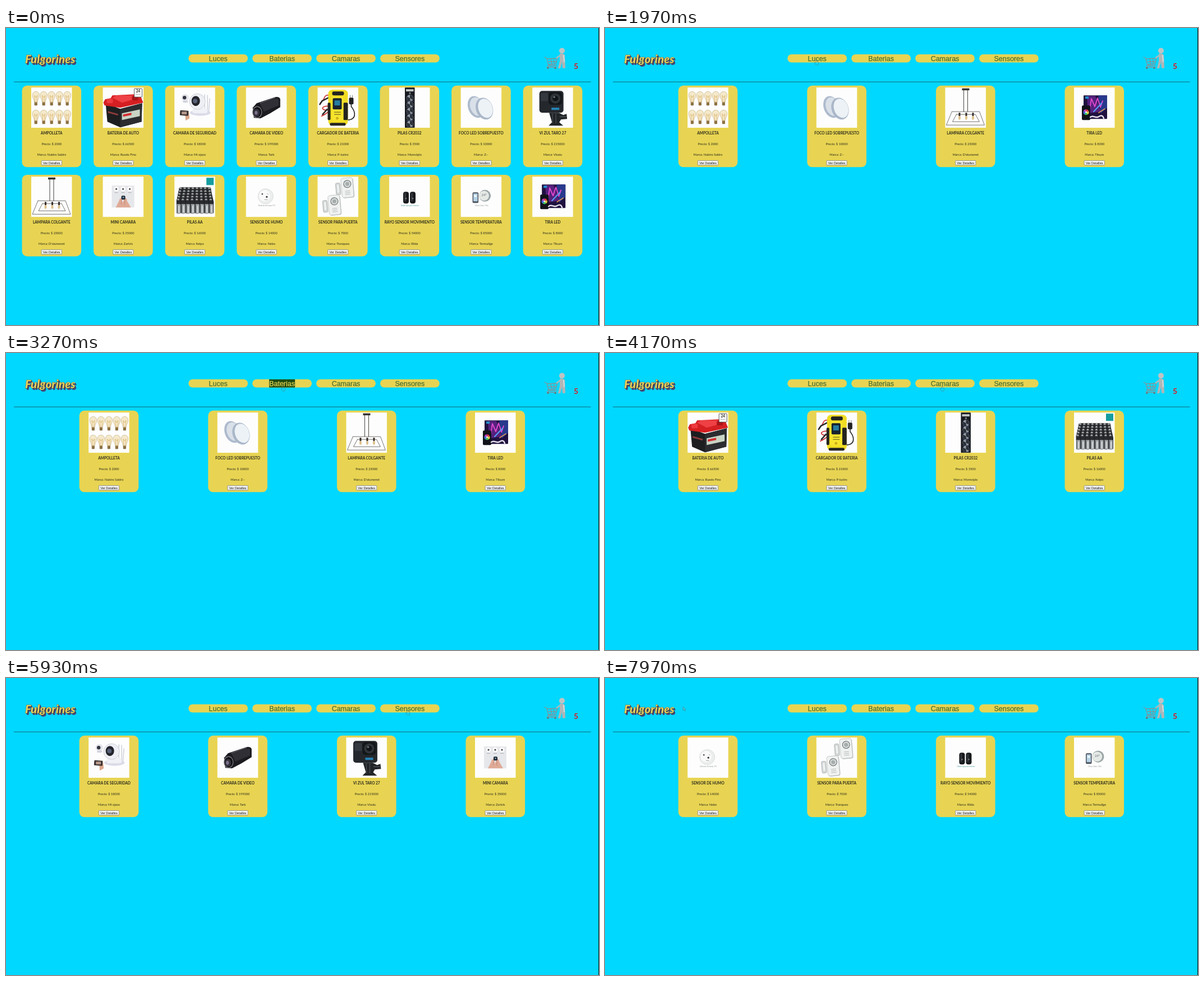
An HTML page that plays this animation: 1057x530 px, repeating every 8000 ms.

```html
<!DOCTYPE html>
<html lang="es">
<head>
<meta charset="utf-8">
<style>
  html, body { margin: 0; width: 100%; height: 100%; overflow: hidden; background: #00d8ff; }
  svg { display: block; }
  text { text-anchor: middle; fill: #2b2a1c; font-family: Lato, sans-serif; }
  .title { font-size: 6.5px; font-weight: 700; }
  .line { font-size: 5.6px; }
  .button { font: 5.7px "Liberation Sans", sans-serif; fill: #111; }
  .nav { font: 12.5px "Liberation Sans", sans-serif; fill: #487032; stroke: #487032; stroke-width: .25px; }
  .tiny { font-size: 3px; fill: #8a8f94; }
  .logo { font-size: 20.3px; font-weight: 900; font-style: italic; text-anchor: start; }
</style>
</head>
<body>
<svg id="stage" width="1057" height="530" viewBox="0 0 1057 530"></svg>
<script>
const rect = (x, y, w, h, fill, r = 0, more = '') =>
  `<rect x="${x}" y="${y}" width="${w}" height="${h}" rx="${r}" fill="${fill}" ${more}/>`;
const disc = (x, y, r, fill, more = '') => `<circle cx="${x}" cy="${y}" r="${r}" fill="${fill}" ${more}/>`;
const oval = (x, y, rx, ry, fill, more = '') =>
  `<ellipse cx="${x}" cy="${y}" rx="${rx}" ry="${ry}" fill="${fill}" ${more}/>`;
const shape = (d, fill, more = '') => `<path d="${d}" fill="${fill}" ${more}/>`;
const stroke = (d, color, width = 1) =>
  shape(d, 'none', `stroke="${color}" stroke-width="${width}" stroke-linecap="round" stroke-linejoin="round"`);
const text = (x, y, cls, str, more = '') => `<text x="${x}" y="${y}" class="${cls}" ${more}>${str}</text>`;
const group = (x, y, body, more = '') => `<g transform="translate(${x} ${y}) ${more}">${body}</g>`;
const repeat = (n, fn) => Array.from({ length: n }, (_, i) => fn(i)).join('');

// Product pictures, each on a 72 x 72 square
const bulb = () => rect(-2.6, 8, 5.2, 7, '#80663b', 1) + stroke('M-2 10.5H2M-2 13H2', '#b79a62', .6) +
  shape('M-2.8 9C-3 4-6.2 2-6.2-3.6A6.2 6.2 0 0 1 6.2-3.6C6.2 2 3 4 2.8 9Z', '#f4e9cb', 'stroke="#c6ae7c" stroke-width=".7"') +
  stroke('M-1.5 8L-2.5-3L0 1L2.5-3L1.5 8', '#d8ab5c', .7);

const bulbs = () => repeat(10, i => group(8.2 + i % 5 * 14, i < 5 ? 17 : 50, bulb()));

const carBattery = () =>
  shape('M5 28L8 61L31 71L69 61L70 28L31 38Z', '#1d1e20') + shape('M31 38L70 28L69 61L31 71Z', '#2b2d30') +
  shape('M1 27L4 21L14 19L17 14L58 12L68 17L72 27L31 36L3 32Z', '#d51f22') +
  shape('M17 18L24 14H56L63 19L34 27Z', '#ee4045') + rect(7, 20, 11, 8, '#ee3a3d', 2) + rect(52, 15, 11, 8, '#a81418', 2) +
  shape('M34 46L66 39V51L34 58Z', '#c9d4c5') + shape('M36 48L51 45V49L36 52Z', '#d22c30') +
  shape('M9 42L27 47V50L9 45Z', '#8d3b3c') +
  rect(56, 2, 14, 15, '#fff', 1, 'stroke="#333" stroke-width=".8"') +
  text(63, 9, 'title', '24') + text(63, 14, 'tiny', 'MESES');

const securityCamera = () =>
  stroke('M54 13V43M59 14V42M63 20L61 45', '#d4d5de', 1.7) +
  oval(46, 45, 18, 5.5, '#dadbe7') + rect(32, 37, 27, 9, '#f0f0f7', 4) +
  disc(41, 25, 14, '#eeeef5', 'stroke="#cdced9"') + oval(38, 24, 7.5, 9, '#23242b') + disc(37, 24, 4, '#586078') +
  disc(19, 18, 6.5, '#e6e6ec') + rect(15, 23, 9, 4, '#d3d3df', 2) + disc(18, 18, 3.2, '#333640') +
  shape('M19 48L26 45L27 55L20 59Z', '#dca78d') +
  rect(10, 41, 15, 9, '#3a302f', 1, 'transform="rotate(5 17 45)"') + rect(13, 43, 9, 5, '#b6988a');

const camcorder = () =>
  shape('M12 36L19 28L52 17Q60 16 61 21V35L43 46L26 55L14 54Z', '#1b1a1f') +
  shape('M25 29L51 20Q58 18 58 23V32L32 43Z', '#302f36') + stroke('M25 28L52 18', '#777680', 1) +
  oval(20, 44, 8, 10, '#111114', 'stroke="#77757c" stroke-width="1.4"') +
  oval(19, 45, 5.5, 7, '#35323c') + oval(18, 45, 2.6, 3.5, '#7c718c');

const charger = () =>
  stroke('M21 14C10 11 14 23 5 27M20 33C3 33 8 42 18 40S14 48 7 51', '#c91b1e', 1.5) +
  stroke('M20 18L8 24L4 30M17 39L9 48', '#292929', 2.5) +
  stroke('M53 58C72 57 66 41 60 34V24', '#222', 1.6) + rect(56, 18, 8, 12, '#222', 2) + stroke('M58 18V14M62 18V14', '#777', 1) +
  rect(19, 4, 35, 63, '#f0dc22', 7) + rect(26, 7, 21, 7, '#242420', 3) +
  rect(18, 27, 5, 31, '#242420', 2) + rect(46, 27, 8, 31, '#242420', 2) +
  rect(25, 16, 21, 43, '#f7e42d', 4) + rect(27, 19, 16, 20, '#18232e', 2) + rect(30, 23, 10, 9, '#267da2') +
  stroke('M30 44H41M30 48H41', '#56511c', 1) + disc(35, 55, 2.4, '#c9ac18') + rect(22, 63, 28, 5, '#242420', 2);

const coinCells = () => rect(28, 0, 17.5, 71.7, '#181a20', 1) + rect(30, 3, 13.5, 4, '#c4c6c8') +
  disc(37, 10, 1.5, '#8b8e96') + repeat(5, i => group(37, 19 + i * 11.6,
    disc(0, 0, 6, '#2c3139', 'stroke="#636a73" stroke-width=".7"') +
    shape('M0 0L-5-3A6 6 0 0 1 0-6ZM0 0L5 3A6 6 0 0 1 1 6Z', '#929ba5') + rect(-7, 4.7, 14, 1.5, '#30374d')));

const ledSpot = () => group(29, 34, oval(-2, 0, 14, 20, '#aebacd') + oval(0, 0, 12, 17, '#d9e0e8'), 'rotate(-20)') +
  group(44, 37, oval(-2, 0, 15, 20, '#aab7ca') + oval(0, 0, 12.5, 17.5, '#edf2f6'), 'rotate(-20)');

const actionCamera = () =>
  shape('M30 45H47L55 49L61 47L62 56L51 57L48 62L55 68H29L35 62Z', '#222528') +
  stroke('M36 47V63M42 47V63M49 52H60', '#484c52', 1.4) +
  rect(12.5, 6, 43, 39, '#24282d', 5) + rect(15, 10, 13, 14, '#343940', 2) +
  rect(29, 8, 24, 23, '#14171a', 5) + disc(41, 19.5, 9, '#30353a') + disc(41, 19.5, 5, '#101317') + disc(39, 17, 1.8, '#68727b') +
  rect(34, 36, 14, 4, '#2584b8');

const hangingLamp = () => rect(30, 1.5, 13, 3.5, '#34302e') +
  stroke('M33 5V43M40 5V43', '#45413e', 1) +
  stroke('M12 43H61L70 67H2L12 43M20 48H54L61 61H13L20 48', '#56524f', .8) +
  repeat(3, i => rect(24 + i * 12, 45, 3, 6, '#352f2b') + oval(25.5 + i * 12, 54, 2, 3.5, '#ddc18b'));

const miniCamera = () => rect(16, 16, 40, 39, '#e6e7eb') +
  repeat(3, i => disc(24 + i * 12, 22, 4.2, '#fff') + disc(24 + i * 12, 22, 1.6, '#4a4c50')) +
  repeat(3, i => rect(21 + i * 12, 28, 6, .8, '#9b9ca0')) +
  shape('M23 55L29 43Q31 36 34 40L35 47L39 39Q43 37 43 43L50 55Z', '#dfaa96') +
  stroke('M34 40L33 49M39 40L39 50', '#b97d70', .7) + rect(33, 34, 7, 7, '#202832', 2) + disc(36.5, 37, 1.5, '#7195ac');

const batteryPack = () => shape('M10 19H64L70 45V65H4V43Z', '#202224') +
  repeat(40, i => {
    const row = Math.floor(i / 8), x = 11 - row * 1.1 + i % 8 * (7.3 + row * .25), y = 21 + row * 5;
    return rect(x - 3, y, 6.2, 9, '#25272a') + oval(x, y, 2.9, 1.7, '#65686b') + oval(x, y - .7, 1.3, .9, '#d4d5d3');
  }) +
  repeat(8, i => rect(4 + i * 8.3, 43, 7, 23, '#292b2e', 2) + rect(4 + i * 8.3, 49, 7, 17, '#a4a8ab', 1) +
    rect(4 + i * 8.3, 50, 1.5, 15, '#505458') + rect(7 + i * 8.3, 52, 2, 12, '#d4d7d8')) +
  rect(57, 2, 13, 13, '#159da0');

const smokeSensor = () => disc(35, 35, 13.5, '#eceeed', 'stroke="#dadddd"') + disc(33, 34, 10, '#fafafa') +
  disc(29, 31, 1.2, '#333') + disc(37, 36, 1.6, '#333') + stroke('M33 41H38M38 30L40 32', '#8a8d8d', .8) +
  text(37, 53, 'tiny', 'Detector de humo, 9 V');

const doorUnit = () => rect(-10, 8, 8, 21, '#d5d8d8', 2, 'stroke="#9da2a2" stroke-width=".7"') + rect(-7.5, 11, 3, 14, '#f2f3f3', 1) +
  rect(1, 1, 21, 35, '#b9bebe', 4) + rect(0, 0, 21, 35, '#f0f1f1', 4, 'stroke="#b5b9b9" stroke-width=".7"') +
  disc(11, 11, 6.5, '#d5d9d9', 'stroke="#5e6464" stroke-width="1"') + disc(11, 11, 3.5, '#a7adad') +
  repeat(3, i => rect(6, 23 + i * 3, 9, 1, '#b5baba'));
const doorSensor = () => group(41, 3, doorUnit(), 'rotate(-5)') + group(18, 34, doorUnit(), 'rotate(-5)');

const motionSensor = () => repeat(2, i => rect(25 + i * 12, 27, 10, 21, '#17191d', 4) +
  rect(27 + i * 12, 29, 3, 15, '#33373c', 1) + disc(30 + i * 12, 39, 1.3, '#777')) +
  text(37, 52.5, 'tiny', 'Doble rayo para exterior', 'style="fill:#4d9ba0"');

const temperatureSensor = () => disc(43, 34, 10.5, '#98a3a5') + disc(41.5, 34, 8.8, '#e4e9e5') +
  rect(21, 28, 10.5, 19, '#4d535f', 2) + rect(22.5, 30, 7.5, 14, '#b5d2e5') + rect(24, 33, 4, 3, '#fff') +
  text(41.5, 35, 'line', '24°', 'style="fill:#667"') + text(37, 53, 'tiny', 'Clima: Calor / Frío');

const ledStrip = () => rect(17, 14, 42, 42, '#20113f', 1) + shape('M23 15H38L48 43L25 46Z', '#55217e') +
  shape('M43 14H59V36L48 46Z', '#28398d') +
  stroke('M28 39L31 20L37 34L42 19L47 35L51 24', '#df48ce', 2) + stroke('M35 43L49 28', '#55a0f4', 2) + stroke('M44 45L55 38', '#efa155', 1.6) +
  rect(20, 16, 6, 4, '#248ed0') + rect(14, 32, 15, 26, '#111219', 2) +
  ['#ef3f49', '#e8d648', '#41c860', '#3b70df', '#bf43c5'].map((c, i) =>
    shape('M0 0V-5A5 5 0 0 1 4.76-1.55Z', c, `transform="translate(21.5 44) rotate(${i * 72})"`)).join('') +
  disc(21.5, 44, 1.6, '#eee') + stroke('M29 53C34 48 38 56 44 52S52 52 53 55', '#e4dfed', 2.4);

const products = [
  ['AMPOLLETA', 2000, 'Nubiro Sabiro', bulbs],
  ['BATERIA DE AUTO', 66500, 'Ruedo Fino', carBattery],
  ['CAMARA DE SEGURIDAD', 18000, 'Mi ojazo', securityCamera],
  ['CAMARA DE VIDEO', 199000, 'Tarb', camcorder],
  ['CARGADOR DE BATERIA', 21000, 'P-lustro', charger],
  ['PILAS CR2032', 3500, 'Moreviplo', coinCells],
  ['FOCO LED SOBREPUESTO', 10000, 'Z--', ledSpot],
  ['VI ZUL TARO 27', 215000, 'Vixalu', actionCamera],
  ['LAMPARA COLGANTE', 23000, "D'olumenet", hangingLamp],
  ['MINI CAMARA', 35000, 'Zarivis', miniCamera],
  ['PILAS AA', 16000, 'Kelpo', batteryPack],
  ['SENSOR DE HUMO', 14000, 'Nebo', smokeSensor],
  ['SENSOR PARA PUERTA', 7000, 'Tranqueo', doorSensor],
  ['RAYO SENSOR MOVIMIENTO', 54000, 'Rilda', motionSensor],
  ['SENSOR TEMPERATURA', 85000, 'Termulige', temperatureSensor],
  ['TIRA LED', 8000, 'Tilsum', ledStrip],
];

function card([name, price, brand, picture], x, y) {
  return group(x, y,
    rect(-52.8, 0, 105.6, 145.5, '#e8d452', 9) +
    group(-36.3, 3.4, rect(0, 0, 72.5, 71.8, '#fdfdfd') + picture()) +
    text(0, 87.4, 'title', name) +
    text(0, 106.4, 'line', `Precio: $ ${price}`) +
    text(0, 125.1, 'line', `Marca: ${brand}`) +
    rect(-18.2, 133.7, 36.4, 8.2, '#f0f0f0', 1, 'stroke="#777" stroke-width=".7"') +
    text(0, 139.9, 'button', 'Ver Detalles'));
}

const page = (list, step, left) => '<g class="page">' + list.map((id, i) =>
  card(products[id], left + i % (1028 / step | 0) * step, i < 8 ? 102.8 : 261.9)).join('') + '</g>';

const shopper = () =>
  stroke('M960 52L964 54L967 67H981M965 55L983 54L980 64L967 65M967 60H981M971 55L973 65M977 55V64M967 67L964 70H981', '#84959a', 1.3) +
  disc(966, 71.5, 1.5, '#626d72') + disc(979, 71.5, 1.5, '#626d72') +
  stroke('M989 48L982 53', '#b5babb', 2.5) + disc(991, 40.5, 5, '#c0c3c4') +
  shape('M987 46Q992 44 996 48L997 71Q994 73 992 71L991 61L988 72H984L987 59Z', '#b1b6b7') +
  stroke('M994 49L995 60', '#d9dbdb', 2);

const navItems = ['Luces', 'Baterias', 'Camaras', 'Sensores'];
const stage = document.getElementById('stage');
stage.innerHTML =
  rect(0, 0, 1057, 530, '#00d8ff') + rect(1056, 0, 1, 530, '#06171c') + rect(14, 95.7, 1028.5, .9, '#17596b') +
  text(36.5, 65.5, 'logo', 'Fulgorines', 'style="fill:#49477d"') +
  text(35.3, 64.2, 'logo', 'Fulgorines', 'style="fill:#2e3954"') +
  text(34, 62.8, 'logo', 'Fulgorines', 'style="fill:#ecd45c;stroke:#65604b;stroke-width:.5"') +
  navItems.map((name, i) => rect(325.3 + i * 113.9, 47, 105.8, 14.5, '#e8d452', 7.2) +
    '<g class="mark">' + rect(378.2 + i * 113.9 - [16.5, 23, 25, 26.5][i], 47, [33, 46, 50, 53][i], 14.5, '#204b10') + '</g>' +
    text(378.2 + i * 113.9, 58.8, 'nav', name)).join('') +
  shopper() + text(1016, 73.4, 'count', '5', 'style="fill:#df1722;font-size:14px;font-weight:700"') +
  page(products.map((_, i) => i), 127.6, 81.3) +
  [[0, 6, 8, 15], [1, 4, 5, 10], [2, 3, 7, 9], [11, 12, 13, 14]].map(ids => page(ids, 229.6, 183.5)).join('') +
  '<g id="cursor" opacity=".7">' +
  shape('M-1 0V5L-3 4L-4 5L-1 9H3L4 4L1 3V0Z', 'none', 'stroke="#59736d" stroke-width=".7"') +
  shape('M-2-3V4L0 2.5L1.5 5L2.5 4.5L1 2H3Z', '#5dc5d5', 'stroke="#476b74" stroke-width=".7"') + '</g>';

const pages = stage.querySelectorAll('.page');
const marks = stage.querySelectorAll('.mark');
const labels = stage.querySelectorAll('.nav');
const cursor = document.getElementById('cursor');
const [hand, arrow] = cursor.children;
const pageStarts = [0, 1830, 3470, 5070, 6670];
const markStarts = [1730, 3270, 4870, 6330];
const cursorPath = [[1730, 377, 57], [2130, 377, 57], [2900, 494, 59], [3670, 494, 59], [4170, 601, 59],
  [5200, 601, 59], [5930, 716, 57], [7100, 716, 57], [7970, 141, 54], [8000, 141, 54]];
const show = (el, on) => el.style.display = on ? '' : 'none';

function cursorAt(t) {
  const i = Math.max(1, cursorPath.findIndex(key => key[0] > t));
  const [t0, x0, y0] = cursorPath[i - 1], [t1, x1, y1] = cursorPath[i];
  const p = (t - t0) / (t1 - t0), ease = p * p * (3 - 2 * p);
  return [x0 + (x1 - x0) * ease, y0 + (y1 - y0) * ease];
}

function draw(t) {
  const current = pageStarts.filter(start => start <= t).length - 1;
  pages.forEach((el, i) => show(el, i === current));
  marks.forEach((el, i) => {
    const on = t >= markStarts[i] && t < pageStarts[i + 1];
    show(el, on);
    labels[i].style.fill = labels[i].style.stroke = on ? '#e8d452' : '';
  });
  show(cursor, t >= cursorPath[0][0]);
  if (t >= cursorPath[0][0]) {
    const [x, y] = cursorAt(t), overNav = x > 325 && x < 773;
    cursor.setAttribute('transform', `translate(${x} ${y})`);
    show(hand, overNav);
    show(arrow, !overNav);
  }
}

function tick() {
  draw(performance.now() % 8000);
  requestAnimationFrame(tick);
}
tick();
</script>
</body>
</html>
```
